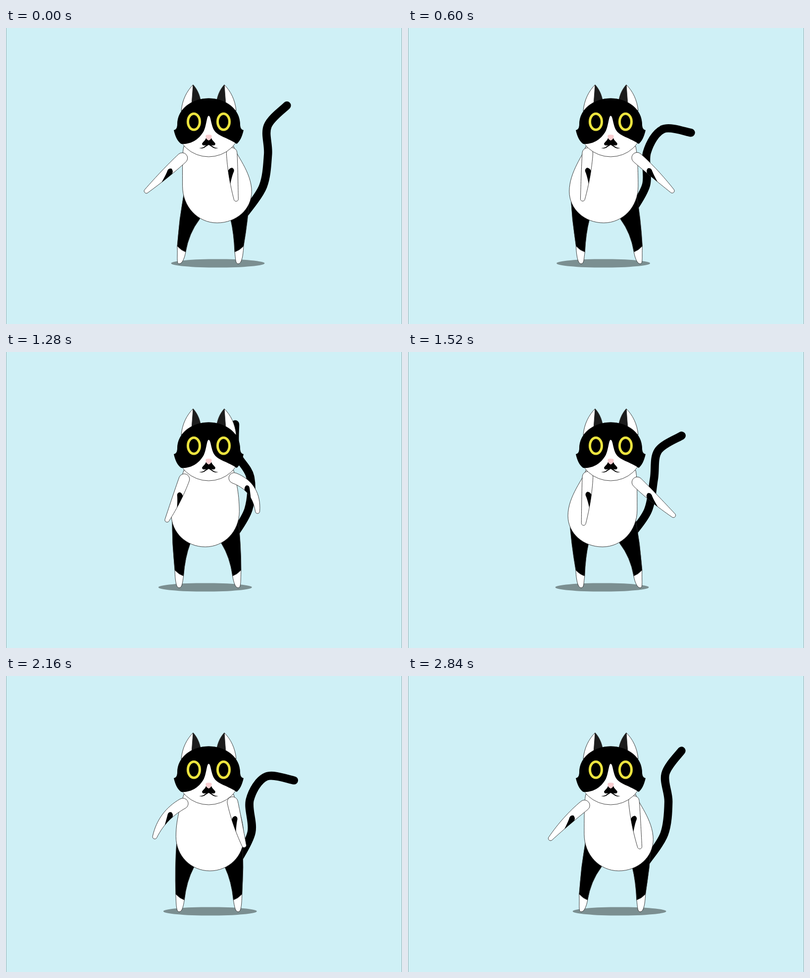
Recreate the animation shown at these times as an HTML page. Size 800x600 px, loop 2880 ms.

```html
<!DOCTYPE html>
<html lang="en">
<head>
<meta charset="utf-8">
<title>Dancing cat</title>
<style>
html, body { margin: 0; width: 100%; height: 100%; overflow: hidden; background: #cff0f6; }
svg { display: block; width: 100vw; height: 100vh; }
.line { stroke: #2b2b2b; stroke-width: .9; stroke-linejoin: round; }
.white { fill: #fff; }
</style>
</head>
<body>
<svg viewBox="0 0 800 600">
  <defs>
    <g id="ear">
      <path class="white line" d="M354 168C356 146 365 128 378 115L377 155Z"/>
      <path class="line" fill="#1c1c1c" d="M378 115C387 125 392 137 394 152L375 155Z"/>
    </g>
    <g id="half">
      <ellipse cx="379.5" cy="190" rx="12" ry="16.2" fill="none" stroke="#ece43f" stroke-width="5"/>
      <path d="M410 228L404 223C403 228 397 231 396 235C397 239 402 238.5 405 237L399 241.5Q395 243.5 390 243Q398 246 403 241L410 236.5Z"/>
    </g>
  </defs>
  <rect width="800" height="600" fill="#cff0f6"/>
  <path d="M.5 0V600M799.5 0V600" stroke="#9ab3b8"/>
  <ellipse id="shadow" cy="477" rx="94.5" ry="8.6" fill="#7b8f91"/>
  <path id="tail" fill="none" stroke="#000" stroke-width="16.5" stroke-linecap="round"/>
  <g id="legL"><path class="line"/><path class="white line"/></g>
  <g id="legR" transform="matrix(-1 0 0 1 819 0)"><path class="line"/><path class="white line"/></g>
  <path id="body" class="white line"/>
  <g id="armL"><path class="white line"/><path/></g>
  <g id="armR" transform="matrix(-1 0 0 1 819 0)"><path class="white line"/><path/></g>
  <use href="#ear"/>
  <use href="#ear" transform="matrix(-1 0 0 1 819 0)"/>
  <ellipse class="white line" cx="409.5" cy="202" rx="63.5" ry="59"/>
  <path d="M354 235C375 236 388 226 397 213C405 203 405 178 409.5 178C414 178 414 198 421 208C428 219 449 223 466 235C472 230 477 221 480 207C475 206 473 202 473 195C473 165 445 142.500 409.500 142.500C374 142.500 346 165 346 195C346 202 344 206 339 207C342 221 347 230 354 235Z"/>
  <use href="#half"/>
  <use href="#half" transform="matrix(-1 0 0 1 819 0)"/>
  <path fill="#f8ced1" d="M404 217Q409.5 215.5 415 217C417 222 413 227 409.5 228C406 227 402 222 404 217Z"/>
</svg>
<script>
const LOOP = 2880, STEP = 40, LAG = 42, TAIL_LOOP = 1440;
const $ = id => document.getElementById(id);
const xy = (x, y) => x.toFixed(2) + ' ' + y.toFixed(2);
const ease = u => (1 - Math.cos(Math.PI * u)) / 2;
const wrap = (t, n) => (t % n + n) % n;

// Moments when the hips turn round: right, left, right ...
const TURNS = [0, 480, 1010, 1450, 1920, 2460, LOOP];

// Left arm: shoulder, elbow control, hand. The right arm is its mirror image.
const OUT = [356, 264, 322, 297, 282, 331];
const FRONT = [363, 253, 361, 300, 355, 347];
const ON_HIP = [360, 248, 305, 252, 336, 316];

// 1 with the hips fully right, 0 fully left
function sway(t) {
  t = wrap(t, LOOP);
  const i = TURNS.findIndex(x => x > t) - 1;
  const e = ease((t - TURNS[i]) / (TURNS[i + 1] - TURNS[i]));
  return i % 2 ? e : 1 - e;
}

function drawArm(id, rest, out) {
  const k = out ** 1.2;
  const [ax, ay, bx, by, cx, cy] = rest.map((r, i) => r + (OUT[i] - r) * k);
  const radius = u => 10.8 - 6.3 * u ** 1.8;
  // point at u along the arm, n half-widths towards the inner edge
  const at = (u, n) => {
    const v = 1 - u;
    const dx = v * (bx - ax) + u * (cx - bx), dy = v * (by - ay) + u * (cy - by);
    const s = n * radius(u) / Math.hypot(dx, dy);
    return xy(v * v * ax + 2 * u * v * bx + u * u * cx + dy * s,
              v * v * ay + 2 * u * v * by + u * u * cy - dx * s);
  };
  const edge = [], back = [];
  for (let i = 0; i <= 16; i++) {
    edge.push(at(i / 16, 1));
    back.unshift(at(i / 16, -1));
  }
  const cap = u => `A${radius(u)} ${radius(u)} 0 0 1 `;
  const [skin, patch] = $(id).children;
  skin.setAttribute('d', `M${edge.join('L')}${cap(1)}${back.join('L')}${cap(0)}${edge[0]}Z`);
  patch.setAttribute('d', `M${at(.38, 1)}Q${at(.32, .7)} ${at(.32, .1)}Q${at(.36, -.5)} ${at(.44, 0)}` +
    `Q${at(.52, .4)} ${at(.66, 1)}L${at(.56, 1)}L${at(.46, 1)}Z`);
}

function drawLeg(id, d) {
  const top = 343 + d, outer = 342.5 + .21 * d, inner = 360 + .18 * d, crotch = 378 + .78 * d;
  const [fur, sock] = $(id).children;
  const hem = `Q${xy(outer + 8, 451)} ${xy(inner, 454)}`;
  fur.setAttribute('d', `M${xy(top, 335)}Q${xy((top + outer) / 2 - 3, 388)} ${xy(outer, 442)}${hem}` +
    `Q${xy((crotch + inner) / 2 - 5 - .15 * d, 416)} ${xy(crotch, 388)}L${xy(crotch + 15, 350)}Z`);
  sock.setAttribute('d', `M${xy(outer, 442)}${hem}` +
    `C${xy(inner - 2, 466)} 356 478 350 478C344 478 ${xy(outer + 1, 466)} ${xy(outer, 442)}Z`);
}

function drawBody(c) {
  const d = c - 410, w = 68.5 + .005 * d * d;
  const l = c - w, r = c + w, yl = 326 - .35 * d, yr = 326 + .35 * d, low = 395;
  const drop = y => y + .56 * (low - y);
  $('body').setAttribute('d', `M359 240C${xy(356, 255)} ${xy(l, yl - 40)} ${xy(l, yl)}` +
    `C${xy(l, drop(yl))} ${xy(c - .56 * w, low)} ${xy(c, low)}` +
    `C${xy(c + .56 * w, low)} ${xy(r, drop(yr))} ${xy(r, yr)}` +
    `C${xy(r, yr - 40)} 463 255 460 240Z`);
}

// Four links: the root swings gently, the tip curls up slowly and whips back.
function drawTail(hip, t) {
  const HIGH = 700, LOW = 1290;
  const ph = wrap(t, TAIL_LOOP);
  const curl = ph >= HIGH && ph < LOW
    ? 1 - ease((ph - HIGH) / (LOW - HIGH))
    : Math.sin(Math.PI / 2 * (wrap(ph - LOW, TAIL_LOOP) / (TAIL_LOOP - LOW + HIGH)) ** .7);
  const swing = Math.cos(2 * Math.PI * (ph - 200) / TAIL_LOOP);
  const links = [[65, 30 + 6 * swing], [66, 3 + 9 * swing], [57, 65 * curl - 30], [57, 100 * curl - 2]];
  const p = [[hip + 55, 375]];
  for (const [len, deg] of links) {
    const [x, y] = p[p.length - 1], a = deg * Math.PI / 180;
    p.push([x + len * Math.sin(a), y - len * Math.cos(a)]);
  }
  let path = 'M' + xy(...p[0]);
  for (let i = 0; i < 4; i++) {
    const a = p[i - 1] || p[i], b = p[i], c = p[i + 1], e = p[i + 2] || c;
    path += `C${xy(b[0] + (c[0] - a[0]) / 6, b[1] + (c[1] - a[1]) / 6)} ` +
      `${xy(c[0] - (e[0] - b[0]) / 6, c[1] - (e[1] - b[1]) / 6)} ${xy(...c)}`;
  }
  $('tail').setAttribute('d', path);
}

function draw(t) {
  const hip = 390 + 38 * sway(t), c = 409.7 + .93 * (hip - 410);
  $('shadow').setAttribute('cx', hip);
  drawTail(hip, t);
  drawLeg('legL', c - 410);
  drawLeg('legR', 410 - c);
  drawBody(c);
  // each hand goes to the hip on one swing of the three
  const late = wrap(t - LAG, LOOP), out = sway(late);
  drawArm('armL', late >= TURNS[4] ? ON_HIP : FRONT, out);
  drawArm('armR', late >= TURNS[1] && late < TURNS[3] ? ON_HIP : FRONT, 1 - out);
}

const start = performance.now();
function tick() {
  const t = (performance.now() - start) % LOOP;
  draw(Math.floor(t / STEP) * STEP);
  requestAnimationFrame(tick);
}
tick();
</script>
</body>
</html>
```
